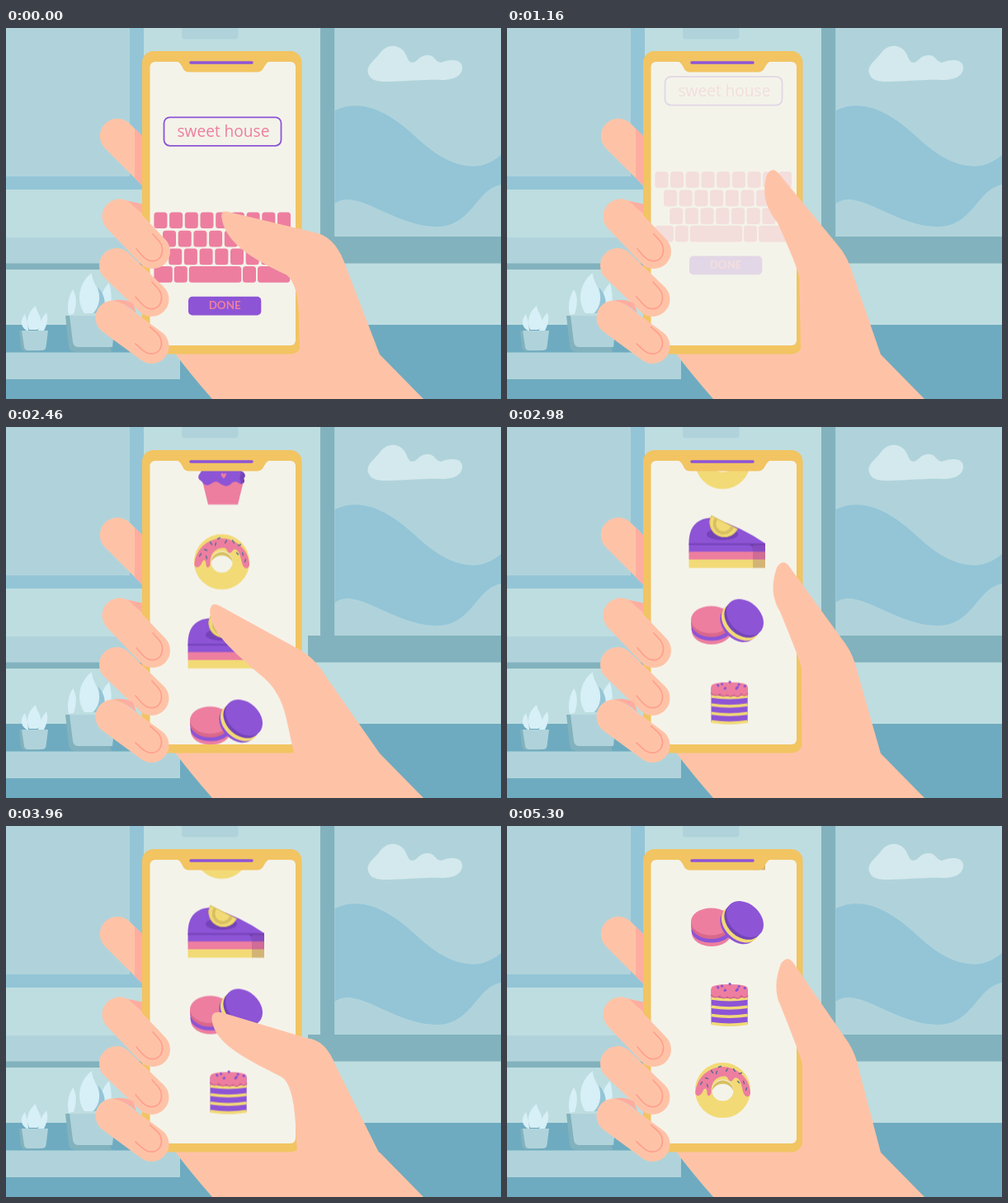
An HTML page that plays this animation: 600 px wide and 450 px high, repeating every 5.4 s.

```html
<!DOCTYPE html>
<html lang="en">
<head>
<meta charset="utf-8">
<title>Ordering sweets</title>
<style>
html, body { margin: 0; width: 100%; height: 100%; overflow: hidden; background: #bedde0; }
svg { display: block; width: 100vw; height: 100vh; }
:root {
  --wall: #bedde0; --pane: #b0d3db; --blue: #93c5d7; --teal: #82b2bd; --deep: #6eabc0; --leaf: #d7eff6;
  --skin: #fec3a7; --blush: #ffad9f; --gold: #f2c462; --screen: #f4f3ea;
  --purple: #8d54d6; --plum: #7443b8; --pink: #ed7e9f; --rose: #d9688c; --yellow: #f2da76; --mustard: #d8c062;
  --rest: path("M453 396L427 297Q423 277 414 263L347 166Q340 156 332 167C324 188 325 205 332 219Q358 284 358 290L358 396Z");
  --type: path("M453 396L412 290Q401 256 378 249L271 224Q259 220 261 231C265 255 285 275 340 300Q354 310 355 350L356 396Z");
  --reach: path("M452 396L400 291Q388 259 365 257L262 226Q248 223 250 236C255 262 280 277 334 304Q348 312 351 360L353 396Z");
  --low: path("M453 396L380 300Q366 281 345 277L231 251Q217 247 219 259C228 285 255 298 312 323Q328 332 336 365L345 396Z");
  --flick: path("M453 396L388 303Q374 279 352 268L259 217Q247 211 247 225C249 247 264 263 312 304Q333 322 340 355L349 396Z");
}
.wall { fill: var(--wall); } .pane { fill: var(--pane); } .blue { fill: var(--blue); }
.teal { fill: var(--teal); } .deep { fill: var(--deep); } .leaf { fill: var(--leaf); }
.skin { fill: var(--skin); } .blush { fill: var(--blush); } .gold { fill: var(--gold); } .screen { fill: var(--screen); }
.purple { fill: var(--purple); } .plum { fill: var(--plum); } .pink { fill: var(--pink); }
.rose { fill: var(--rose); } .yellow { fill: var(--yellow); } .mustard { fill: var(--mustard); }
.line { fill: none; stroke-linecap: round; }
.finger { stroke: var(--skin); stroke-width: 42; }
.nail { stroke: #ff9f8e; stroke-width: 1.7; }
.field { font: 19.1px "Open Sans", "Noto Sans", sans-serif; }
.done { font: 700 13.4px Lato, "Open Sans", sans-serif; }

#form, #list, #thumb { animation: form 5.4s linear infinite; }
#list { animation-name: list; }
#thumb { animation-name: thumb; }

@keyframes form {
  0%, 14.44% { transform: none; opacity: 1; animation-timing-function: cubic-bezier(.4,.05,.5,.95); }
  24.81%, 100% { transform: translateY(-60px); opacity: 0; }
}
@keyframes list {
  0%, 31.85% { transform: translateY(297px); opacity: 0; animation-timing-function: ease-out; }
  38.15% { transform: translateY(267.5px); opacity: 1; }
  42.22% { transform: translateY(267.5px); animation-timing-function: cubic-bezier(.3,0,.15,1); }
  61.85% { transform: translateY(106.5px); }
  73.33% { transform: translateY(106.5px); animation-timing-function: cubic-bezier(.3,0,.15,1); }
  98.15%, 100% { transform: none; opacity: 1; }
}
@keyframes thumb {
  0% { d: var(--type); animation-timing-function: ease-out; }
  4.44%, 31.3%, 62.59% { d: var(--rest); animation-timing-function: cubic-bezier(.42,.1,.9,.8); }
  11.48%, 38.89%, 73.33% { d: var(--reach); animation-timing-function: ease-out; }
  14.44%, 41.85%, 76.3% { d: var(--low); animation-timing-function: cubic-bezier(.5,0,.9,.8); }
  17.78%, 45.56%, 80% { d: var(--flick); animation-timing-function: cubic-bezier(.25,.46,.45,.94); }
  24.81%, 58.15%, 92.6%, 100% { d: var(--rest); }
}
</style>
</head>
<body>
<svg viewBox="0 0 600 450" preserveAspectRatio="none">
  <defs>
    <clipPath id="glass"><rect x="174.5" y="41" width="176.5" height="344" rx="6"/></clipPath>
    <path id="nail" class="line nail" d="M158 268L165 276C173 285 182 284 187 278C191 272 190 264 186 259L178 250"/>
    <g id="donut">
      <circle r="23.3" fill="none" stroke="var(--yellow)" stroke-width="20.4"/>
      <path class="mustard" d="M-13 1A13 13 0 0 1 13 1A13.5 12 0 0 0 -13 1Z"/>
      <path class="pink" d="M-33.3 3A33.5 33.5 0 0 1 33.5 2C34 9 27 10 25 3C23-4 22-13 17-15C13-17 13-10 9-11C6-12 7-17 2-17C-5-17-11-13-13-6C-14-3-14 1-14 3C-15 8-19 8-19 3C-19-2-22-4-24 1C-26 7-32 9-33.3 3Z"/>
      <path class="line" stroke="#5a6f91" stroke-width="1.4" d="M-27-7l2-3M-21-15l3 1M-14-24l2 3M-5-28l3-1M4-23l2-3M13-26l2 3M20-20l3-1M25-11l1 3M29-3l-1 3M-8-20l1-3M18-11l2 2M-19-7l1 3"/>
    </g>
  </defs>

  <!-- room -->
  <rect class="wall" width="600" height="450"/>
  <path class="blue" d="M150 0h17v196H0v-16h150z"/>
  <path class="pane" d="M0 0h150v180H0zM0 254h170v32H0z"/>
  <path class="teal" d="M0 285.500h170v7.500H0z"/>
  <path class="deep" d="M0 360h600v90H0z"/>
  <path class="pane" d="M0 393.500h211v32.500H0zM213 0h68.500v10q0 3.500-3.500 3.500h-61.500q-3.500 0-3.500-3.500z"/>
  <path class="teal" d="M381 0h17.500v253H600v32.500H366V253h15z"/>
  <path class="pane" d="M398.500 0H600v253H398.500z"/>
  <path class="blue" d="M398.500 100C435 83 470 107 500 135C530 163 555 170 575 167Q590 163 600 154V190C570 195 565 241 522 241C480 241 440 208 414 208Q405 208 398.500 213Z"/>
  <path fill="#d4e9ed" d="M440 57C434 47 447 39 453 31C461 19 474 20 480 26C487 32 486 41 492 42C499 42 500 33 511 33C520 33 520 41 527 42C535 38 553 36 553 48C553 58 543 63 528 63C505 62 480 65 460 65Q443 65 440 57Z"/>

  <!-- plants -->
  <path class="leaf" d="M25 367C16 361 18 353 23 347C25 354 27 360 27 367ZM39 367C40 359 43 352 49 345C52 354 49 361 46 367Z"/>
  <path class="leaf" d="M28 366C23 354 28 343 36 337C37 345 44 350 42 358Q41 364 38 366Z"/>
  <path class="teal" d="M16 367h22l3 23q0 2-3 2H23q-4 0-5-5z"/>
  <path class="pane" d="M19 367h32l-2.500 20q-.5 4-5 4H27q-4.500 0-5-4z"/>
  <path class="leaf" d="M76 348C73 334 77 324 81 317C86 325 86 335 82 347ZM114 346C113 329 116 318 125 309C128 322 130 333 123 346Z"/>
  <path class="blue" d="M106 346C115 334 113 320 111 314C121 324 122 337 116 346Z"/>
  <path class="leaf" d="M95 346C84 330 89 308 104 297C104 309 115 317 113 330Q112 340 105 346Z"/>
  <path class="teal" d="M72 349h44l12 44H85q-8 0-9-7z"/>
  <path class="pane" d="M77 349h56l-4 38H88q-6 0-7-6z"/>

  <!-- hand behind the phone -->
  <path class="skin" d="M205 395Q222 418 250 450H506L453 396L360 365Z"/>
  <path class="skin" d="M170 136L150 116A21 21 0 0 0 120 146L170 196Z"/>
  <path class="blush" d="M156 122l14 14v60l-14-14z"/>

  <!-- phone -->
  <rect class="gold" x="165" y="28" width="193.500" height="367.500" rx="14"/>
  <rect class="screen" x="174.500" y="41" width="176.500" height="344" rx="6"/>
  <g clip-path="url(#glass)">
    <g id="form">
      <rect x="191.500" y="108.300" width="142" height="34.500" rx="7" fill="none" stroke="var(--purple)" stroke-width="1.8"/>
      <text class="pink field" x="207.500" y="132">sweet house</text>
      <g id="keys" class="pink"></g>
      <rect class="purple" x="221" y="325.700" width="88.300" height="22.800" rx="5"/>
      <text class="pink done" x="265.200" y="341.300" text-anchor="middle">DONE</text>
    </g>

    <g id="list">
      <!-- cupcake -->
      <g transform="translate(0 -240)">
        <path class="pink" d="M238 66h50l-7 28.500h-36z"/>
        <path class="purple" d="M234 64C231 58 237 57 237 52C237 47 242 48 244 45C247 39 255 38 261 36C268 37 278 40 280 46C286 47 287 51 285 54C290 56 291 60 288 63C291 67 287 70 283 69C279 66 276 66 272 70C267 74 262 71 258 68C252 64 249 71 244 71C239 71 239 67 234 64Z"/>
        <path class="plum" d="M285 54C290 56 291 60 288 63C291 67 287 70 284 69C287 65 281 64 284 60Z"/>
        <path class="pink" d="M264 63C258 58 261 55 264 57.500C267 55 269 58 264 63Z"/>
      </g>
      <use href="#donut" x="261.500" y="-76"/>

      <!-- cake slice -->
      <g transform="translate(0 -106.500)">
        <path class="purple" d="M220.500 141V128C221 109 231 99 249 99Q286 111 313 130V141Z"/>
        <path class="plum" d="M220.500 130H313v2H299l-1 2-4-2H220.500z"/>
        <path class="pink" d="M220.500 140H313v9.500H220.500z"/>
        <path class="yellow" d="M220.500 149.500H313v10.300H220.500z"/>
        <path d="M294 131H313v28.800H298V139q0-5-4-8z" fill="#6b2f73" opacity=".22"/>
        <ellipse class="plum" cx="261" cy="119" rx="19" ry="7"/>
        <g transform="translate(263.500 104.500) rotate(27)">
          <path class="yellow" d="M-18 0H18A18 18 0 0 1 -18 0Z"/>
          <path class="line" stroke="var(--mustard)" stroke-width="1" d="M-17.500 0H17.500A17.500 17.500 0 0 1 -17.500 0Z"/>
          <path class="line" stroke="var(--mustard)" stroke-width="4" stroke-dasharray="3.500 2.800" stroke-linecap="butt" d="M-11 2A11 11 0 0 0 11 2"/>
        </g>
      </g>

      <!-- macarons -->
      <ellipse class="pink" cx="248" cy="130" rx="24" ry="16"/>
      <path class="purple" d="M223.500 121V128C227 146 269 146 272 128V118Z"/>
      <ellipse class="rose" cx="247.500" cy="120" rx="24.500" ry="17"/>
      <ellipse class="pink" cx="247.500" cy="116" rx="24.500" ry="16.500"/>
      <g transform="translate(288.500 113) rotate(43)">
        <ellipse class="purple" cx="0" cy="12" rx="25" ry="18"/>
        <ellipse class="yellow" cx="0" cy="8.500" rx="26" ry="18.500"/>
        <ellipse class="plum" cx="0" cy="3.500" rx="25.500" ry="19"/>
        <ellipse class="purple" rx="25.500" ry="18.500"/>
      </g>

      <!-- layer cake -->
      <path class="purple" d="M247.500 198H291.700V240Q270 245 247.500 240Z"/>
      <g id="layers" class="line" stroke="var(--yellow)" stroke-width="3.500"></g>
      <path class="pink" d="M247.500 197Q248 192 269.500 192Q291 192 291.700 197V206Q288 210 284 206Q280 212 275 207Q271 211 267 207Q262 211 258 206Q252 210 247.500 205Z"/>
      <path class="line" stroke="var(--rose)" stroke-width="1.500" d="M247.500 205Q252 210 258 206Q262 211 267 207Q271 211 275 207Q280 212 284 206Q288 210 291.700 206"/>
      <path class="line" stroke="var(--purple)" stroke-width="3" d="M255.500 195.500l.5.500M264 199.500l.7-.5M270 191.500l.3.300M278 199.500l1.600-1.600M288 196.500l.5.200M260.500 194l.3.200M281 194.500l.3.200"/>
      <use href="#donut" x="261.500" y="320.500"/>
    </g>
  </g>
  <path class="gold" d="M205 40Q211 41 213.500 47Q216 53.500 221 53.500H305Q310 53.500 313 47Q316 41 321 40Z"/>
  <path class="line" stroke="var(--purple)" stroke-width="3.500" d="M224 42H298"/>

  <!-- hand in front of the phone -->
  <path class="skin" d="M137 207L165 214V240L130 240Z"/>
  <path class="blush" d="M146 209.500L165 213.500V225Z"/>
  <path class="line finger" d="M137.500 228.500L178 271M134 288L176.500 329M129.500 351.500L176.500 386"/>
  <path class="blush" d="M130 330.500Q143 328 154 334L158 346Q145 334 130 330.500Z"/>
  <use href="#nail"/>
  <use href="#nail" x="-1" y="58"/>
  <use href="#nail" transform="translate(-1 113) rotate(-7 174 270)"/>
  <path id="thumb" class="skin" d="M453 396L427 297Q423 277 414 263L347 166Q340 156 332 167C324 188 325 205 332 219Q358 284 358 290L358 396Z"/>
</svg>
<script>
const add = (parent, tag, attrs) => {
  const node = document.createElementNS("http://www.w3.org/2000/svg", tag);
  for (const name in attrs) node.setAttribute(name, attrs[name]);
  parent.append(node);
};
const keys = document.getElementById("keys");
const key = (x, y, width = 16) => add(keys, "rect", { x, y, width, height: 19.7, rx: 3.5 });

// x, y and key count of the letter rows
for (const [x, y, count] of [[179.4, 223.4, 9], [190, 245.7, 8], [197.2, 267.5, 8]])
  for (let i = 0; i < count; i++) key(x + i * 18.7, y);
// x and width of the bottom row
for (const [x, width] of [[179.4, 22.4], [203.8, 16], [221.8, 63.4], [287, 16], [305, 39.2]])
  key(x, 289, width);

const layers = document.getElementById("layers");
for (let i = 0; i < 4; i++) {
  const y = 209 + i * 10.2;
  add(layers, "path", { d: `M247.500 ${y}Q269.500 ${y + 3.5} 291.700 ${y}`, "stroke-linecap": "butt" });
}
</script>
</body>
</html>
```
